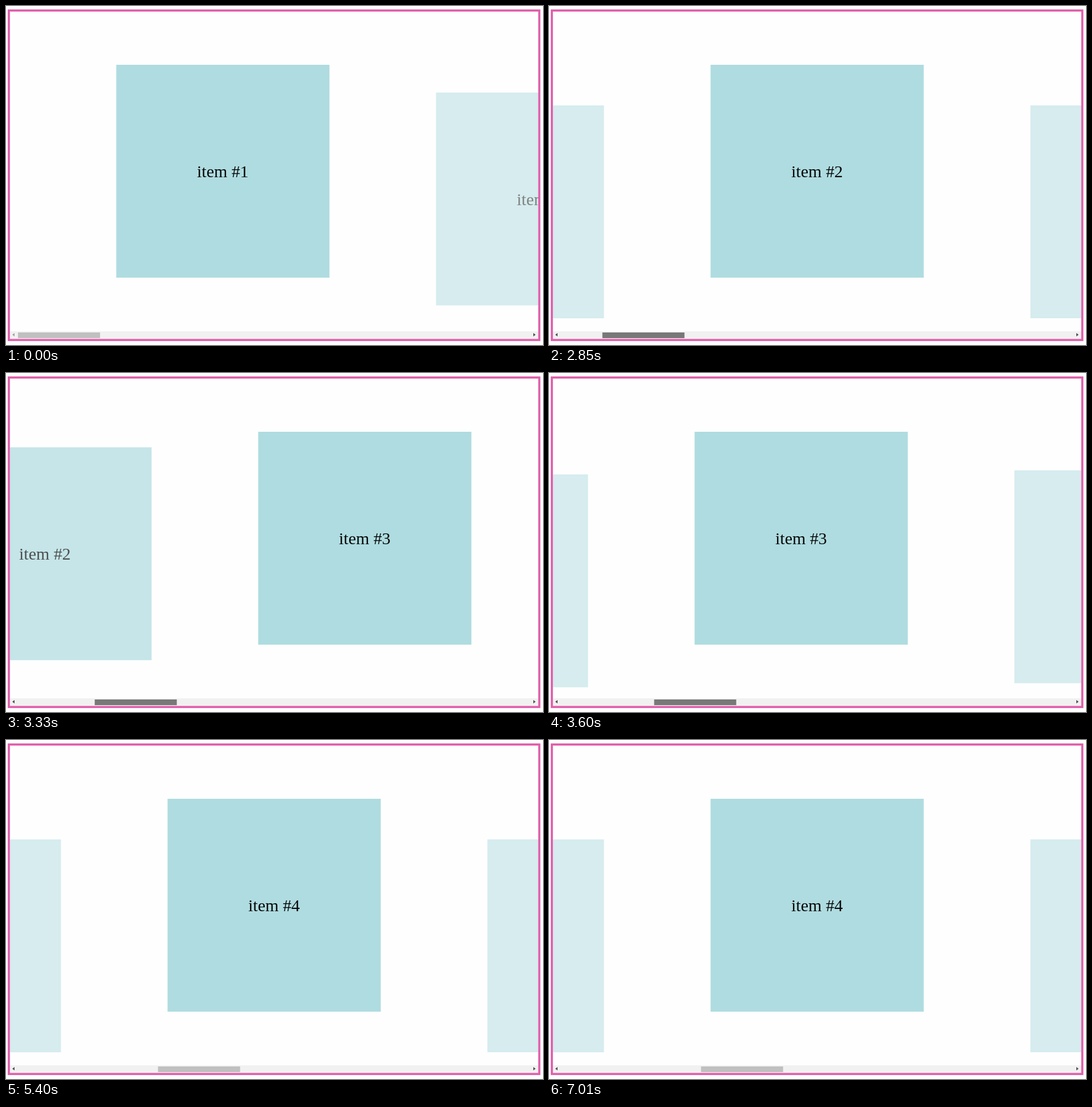
An HTML page that plays this animation: 942x594 px, repeating every 7.57 s.

```html
<!DOCTYPE html>
<html lang="en">
<head>
<meta charset="utf-8">
<title>Scroll snapping items</title>
<style>
  html, body { margin: 0; width: 100%; height: 100%; overflow: hidden; background: #fefefe; }
  .view { position: absolute; left: 7px; top: 10px; width: 927px; height: 573px; overflow: hidden; }
  .border { position: absolute; left: 0; top: 0; }
  .item {
    position: absolute; left: 0; top: 92.6px; width: 373.8px; height: 373.6px;
    background: #afdce0; color: #060808;
    font: 29.9px/373.6px "Liberation Serif", "Times New Roman", serif;
    text-align: center; white-space: nowrap;
  }
  .bar { position: absolute; left: 0; right: 0; bottom: 0; height: 13px; background: #f1f1f1; }
  .thumb { position: absolute; left: 14px; top: 2px; width: 143.5px; height: 10px; }
  .arrow { position: absolute; top: 3.2px; border: 3.5px solid transparent; }
  .prev { left: 4px; border-left-width: 0; border-right: 4px solid; }
  .next { right: 5px; border-right-width: 0; border-left: 4px solid #505050; }
</style>
</head>
<body>
<div class="view">
  <div class="bar">
    <div class="arrow prev"></div>
    <div class="thumb"></div>
    <div class="arrow next"></div>
  </div>
</div>
<svg class="border" width="942" height="594">
  <rect x="5" y="7.9" width="930.5" height="577.3" fill="none" stroke="#e05fab" stroke-width="3.75"/>
</svg>
<script>
const LOOP = 7570, STEP = 30, LAG = 20;
const SIZE = 374, GAP = 561, FIRST = 186.4, VIEW = 927;

const linear = p => p;
const easeOut = p => 1 - (1 - p) ** 2;
const easeInOut = p => p * p * (3 - 2 * p);

// [start, end, scroll from, scroll to, easing]
const moves = [
  [1680, 2260, 0, 471, easeInOut],
  [2850, 3330, 471, 873, linear],
  [3330, 3600, 873, 1060, linear],
  [3600, 3840, 1060, 1036, easeInOut],
  [4070, 4630, 1036, 1032, linear],
  [4790, 4970, 1032, 1040, easeInOut],
  [5000, 5360, 1601, 1593, easeOut]
];
const held = [[1680, 2200], [2850, 3630]];

const clamp = (v, lo, hi) => Math.min(hi, Math.max(lo, v));
const view = document.querySelector(".view");
const bar = document.querySelector(".bar");
const thumb = document.querySelector(".thumb");
const prev = document.querySelector(".prev");

const items = Array.from({ length: 6 }, (_, i) => {
  const el = document.createElement("div");
  el.className = "item";
  el.textContent = `item #${i + 1}`;
  view.insertBefore(el, bar);
  return el;
});

function scrollAt(t) {
  let pos = 0;
  for (const [start, end, from, to, ease] of moves) {
    if (t < start) break;
    pos = from + (to - from) * ease(clamp((t - start) / (end - start), 0, 1));
  }
  return pos;
}

// Share of an item that lies outside the viewport
const hidden = x => clamp(Math.max(-x, x + SIZE - VIEW) / SIZE, 0, 1);

function draw(t) {
  const scroll = scrollAt(t);
  const late = scrollAt(t - LAG);
  items.forEach((el, i) => {
    const x = FIRST + i * GAP;
    const out = hidden(x - late);
    el.style.transform = `translate(${x - scroll}px, ${out * SIZE / 4}px)`;
    el.style.opacity = Math.max(0.5, 1 - out);
  });
  const active = held.some(([a, b]) => t >= a && t < b);
  thumb.style.transform = `translateX(${scroll * 0.1542}px)`;
  thumb.style.background = active ? "#787878" : "#c0c0c0";
  prev.style.borderRightColor = scroll > 0 ? "#505050" : "#a3a3a3";
}

const origin = performance.now();
function tick() {
  const t = (performance.now() - origin) % LOOP;
  draw(Math.floor(t / STEP) * STEP);
  requestAnimationFrame(tick);
}
tick();
</script>
</body>
</html>
```
